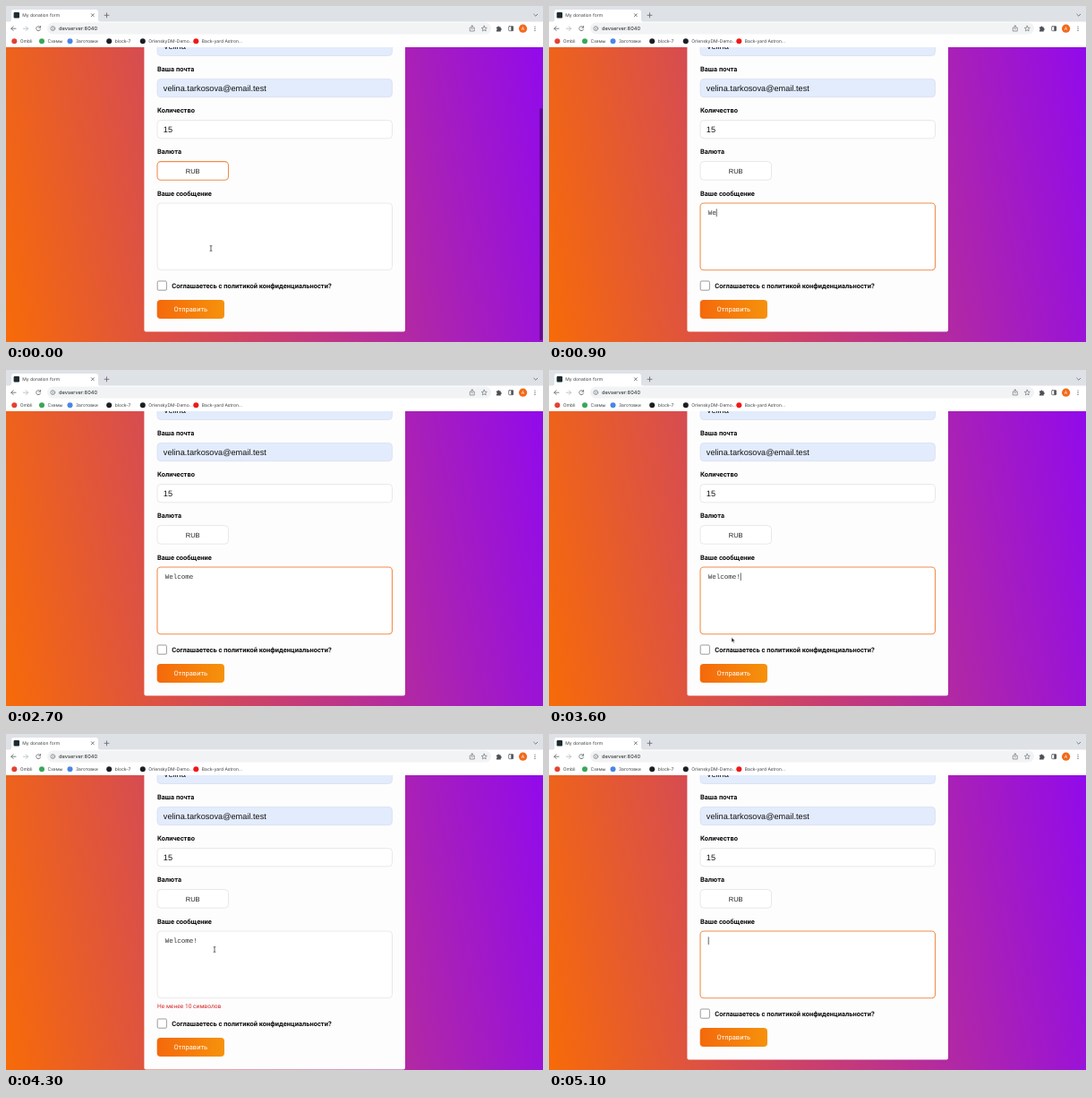
An HTML page that plays this animation: 600x375 px, repeating every 5.2 s.

```html
<!DOCTYPE html>
<html lang="ru">
<head>
<meta charset="utf-8">
<title>My donation form</title>
<style>
  html, body { margin: 0; width: 100%; height: 100%; overflow: hidden; background: #fff; }
  svg { display: block; width: 600px; height: 375px; }
  text { white-space: pre; text-rendering: geometricPrecision; }
  .ui { font: 5px Inter, "Open Sans", sans-serif; fill: #3c4043; }
  .url { font-size: 5.7px; fill: #202124; }
  .label { font: 700 7.5px Roboto, sans-serif; fill: #0c0c0c; }
  .value { font: 9.2px "Liberation Sans", Arial, sans-serif; fill: #111; }
  .choice { font: 7.5px "Liberation Sans", Arial, sans-serif; fill: #222; text-anchor: middle; }
  .send { font: 7.5px Roboto, sans-serif; fill: #fff; text-anchor: middle; }
  .error { font: 6.67px Roboto, sans-serif; fill: #d32626; }
  .mono { font: 7.5px "Liberation Mono", "Courier New", monospace; fill: #333; }
  .field { fill: #fff; stroke: #e3e3e6; stroke-width: .8; }
  .filled { fill: #e3ecfc; stroke: #d9e0ec; }
  .icon { fill: none; stroke: #5f6368; stroke-width: .8; stroke-linecap: round; stroke-linejoin: round; }
</style>
</head>
<body>
<svg viewBox="0 0 600 375">
  <defs>
    <linearGradient id="sky" gradientUnits="userSpaceOnUse" x1="-26.5" y1="225" x2="626.5" y2="110">
      <stop offset="0" stop-color="#f76b08"/>
      <stop offset="1" stop-color="#8f08f0"/>
    </linearGradient>
    <linearGradient id="warm">
      <stop offset="0" stop-color="#f4690b"/>
      <stop offset="1" stop-color="#f6920c"/>
    </linearGradient>
  </defs>

  <rect y="46" width="600" height="329" fill="url(#sky)"/>
  <rect id="thumb" x="596.3" y="114" width="3.2" height="259" rx="1.6" fill="#000" fill-opacity=".38"/>
  <rect id="card" x="154.4" y="30" width="291.6" rx="2" fill="#fefdfe"/>

  <rect class="field filled" x="169" y="35.2" width="262.5" height="20.3" rx="4"/>
  <text class="value" x="175.8" y="48.4">Velina</text>
  <text class="label" x="169" y="72.8">Ваша почта</text>
  <rect class="field filled" x="169" y="81.4" width="262.5" height="20.3" rx="4"/>
  <text class="value" x="175.8" y="94.6">velina.tarkosova@email.test</text>
  <text class="label" x="169" y="119">Количество</text>
  <rect class="field" x="169" y="127.5" width="262.5" height="20.3" rx="4"/>
  <text class="value" x="175.8" y="140.9">15</text>
  <text class="label" x="169" y="165.3">Валюта</text>
  <rect id="currency" class="field" x="169" y="173.6" width="79.5" height="20.6" rx="4"/>
  <text class="choice" x="208.7" y="186.5">RUB</text>
  <text class="label" x="169" y="211.5">Ваше сообщение</text>
  <rect id="area" class="field" x="169" y="220" width="262.5" height="74.7" rx="4"/>
  <rect id="selection" y="226.6" height="8.8" fill="#a8c9ee"/>
  <text id="message" class="mono" x="177.8" y="233"></text>
  <rect id="caret" y="226.4" width=".7" height="8.6" fill="#222"/>
  <text id="error" class="error" x="169" y="306">Не менее 10 символов</text>

  <g id="footer">
    <rect x="169.2" y="307" width="10.2" height="10.2" rx="1.2" fill="#fff" stroke="#858585" stroke-width=".8"/>
    <text class="label" x="185.3" y="314.6">Соглашаетесь с политикой конфиденциальности?</text>
    <rect x="168.7" y="328" width="75.3" height="21" rx="4" fill="url(#warm)"/>
    <text class="send" x="206.3" y="341.2">Отправить</text>
  </g>

  <!-- browser window -->
  <rect width="600" height="18" fill="#dee1e6"/>
  <path d="M3 18Q6 18 6 15V7Q6 4 9 4H100Q103 4 103 7V15Q103 18 106 18Z" fill="#fff"/>
  <rect y="17.5" width="600" height="28.5" fill="#fff"/>
  <rect x="8.6" y="7" width="6.4" height="6.4" rx="1" fill="#1d2b30"/>
  <text class="ui" x="18.2" y="12">My donation form</text>
  <rect x="46" y="18.6" width="496" height="13" rx="6.5" fill="#f1f3f4"/>
  <text class="ui url" x="59" y="27.1">devserver:8040</text>
  <g class="icon">
    <path d="M95.3 8.7l3 3m0-3l-3 3M110 10.3h5m-2.5-2.5v5M589.8 9.2l2 2 2-2"/>
    <path d="M11 25.2H5.8m2.4-2.4l-2.4 2.4 2.4 2.4"/>
    <path d="M19.4 25.2h5.2m-2.4-2.4l2.4 2.4-2.4 2.4" stroke="#b4b7bb"/>
    <path d="M38.2 23.6A2.5 2.5 0 1 0 38.6 26M38.6 22.4v1.8h-1.8"/>
    <circle cx="52.3" cy="25.1" r="2.4" stroke-width=".6"/>
    <path d="M52.3 25v1.3m0-2.5v.1" stroke-width=".6"/>
    <path d="M519.6 24.2h-1.3v3.8h5v-3.8h-1.3M520.8 26v-4.2m-1.3 1.3l1.3-1.3 1.3 1.3" stroke-width=".6"/>
    <path d="M534.3 22.2l.9 2 2.1.2-1.6 1.4.5 2.1-1.9-1.1-1.9 1.1.5-2.1-1.6-1.4 2.1-.2z" stroke-width=".6"/>
    <rect x="561.7" y="22.7" width="5" height="5" rx=".6"/>
  </g>
  <g fill="#4d5156">
    <path d="M548 23.5h1.4a1 1 0 0 1 2 0h1.4v1.5a1 1 0 0 1 0 2v1.4H548v-1.5a1 1 0 0 0 0-1.9z"/>
    <rect x="564.3" y="22.7" width="2.4" height="5"/>
    <circle cx="591" cy="23" r=".6"/><circle cx="591" cy="25.2" r=".6"/><circle cx="591" cy="27.4" r=".6"/>
  </g>
  <circle cx="577.6" cy="25.2" r="4.6" fill="#f26a1b"/>
  <text class="ui" x="577.6" y="27" text-anchor="middle" style="fill:#fff">А</text>
  <g id="bookmarks"></g>

  <g id="cursor" stroke-linejoin="round">
    <path id="arrow" d="M0 0V5.4L1.3 4.2 2.2 6.2 3.1 5.8 2.2 3.9H3.9Z" fill="#111" stroke="#fff" stroke-width=".5"/>
    <path id="beam" d="M-1.3-3Q0-3 0-2.2Q0-3 1.3-3M0-2.2V2.2M-1.3 3Q0 3 0 2.2Q0 3 1.3 3" fill="none" stroke="#222" stroke-width=".7"/>
    <path id="hand" d="M-.6 0Q0-.7.6 0V2.4L2.8 3Q3.3 3.3 3.2 4L2.7 6.6H-.7L-2.3 4.2Q-2.2 3.3-1.4 3.7L-.6 4.3Z" fill="#fff" stroke="#111" stroke-width=".6"/>
  </g>
</svg>
<script>
const LOOP = 5200, STEP = 100, FADE = 200, BLINK = 500;
const TEXT = "Welcome!", TEXT_X = 177.8, CHAR = 4.5, ERROR_SHIFT = 11;
const FOCUS = 300, SUBMIT = 3900, SELECT = 4700, CLEAR = 5100;

// [time, typed characters]
const keys = [[FOCUS, 0], [800, 1], [900, 2], [1000, 3], [1100, 5], [1200, 7], [3200, 8], [CLEAR, 0]];
// [time, x, y]
const path = [
  [0, 229, 270.5], [3400, 227, 268], [3600, 204, 298.5], [3800, 204, 338], [4100, 206, 342],
  [4300, 233, 240.5], [4500, 216, 232], [4700, 214, 231], [4900, 148.5, 233.5], [5200, 148.5, 233.5]
];
const bookmarks = [
  [9.3, "#e34133", "Ombli"], [40, "#3aa757", "Схемы"], [71.5, "#4a86e8", "Заготовки"],
  [115.2, "#1b1f23", "block-7"], [152.8, "#1b1f23", "OrlenskyDM-Demo..."], [212.3, "#f01818", "Back-yard Astron..."]
];

const $ = id => document.getElementById(id);
const clamp = v => Math.max(0, Math.min(1, v));
const show = (id, on) => $(id).setAttribute("visibility", on ? "visible" : "hidden");
const set = (id, attrs) => { for (const k in attrs) $(id).setAttribute(k, attrs[k]); };
const ramp = (t, start) => clamp((t - start) / FADE);

$("bookmarks").innerHTML = bookmarks.map(([x, color, name]) =>
  `<circle cx="${x}" cy="39.3" r="3" fill="${color}"/><text class="ui" x="${x + 6.5}" y="41.1">${name}</text>`).join("");

function pointAt(t) {
  const i = Math.max(1, path.findIndex(p => p[0] > t));
  const [a, b] = [path[i - 1], path[i]];
  const k = (t - a[0]) / (b[0] - a[0]);
  return [a[1] + (b[1] - a[1]) * k, a[2] + (b[2] - a[2]) * k];
}

function outline(id, k) {
  const mix = (a, b) => Math.round(a + (b - a) * k);
  $(id).style.stroke = `rgb(${mix(227, 240)},${mix(227, 142)},${mix(230, 76)})`;
  $(id).style.strokeWidth = .8 + .3 * k;
}

function drawCursor(t, shift) {
  const [x, y] = pointAt(t);
  const inside = (left, top, right, bottom) => x > left && x < right && y > top && y < bottom;
  const onArea = inside(169, 220, 431, 295);
  const onButton = inside(169, 328 + shift, 244, 349 + shift);
  const seen = t < 800 || (t >= 3400 && t < CLEAR);
  set("cursor", { transform: `translate(${x} ${y})` });
  show("beam", seen && onArea);
  show("hand", seen && onButton);
  show("arrow", seen && !onArea && !onButton);
}

function draw(t) {
  const [edited, count] = keys.filter(k => k[0] <= t).pop() || [0, 0];
  const failed = t >= SUBMIT && t < CLEAR;
  const shift = failed ? ERROR_SHIFT : 0;
  const typing = (t >= FOCUS && t < SUBMIT) || t >= CLEAR;
  const end = TEXT_X + count * CHAR;

  outline("currency", 1 - ramp(t, FOCUS));
  outline("area", ramp(t, FOCUS) - ramp(t, SUBMIT) + ramp(t, SELECT));
  set("thumb", { opacity: 1 - clamp((t - 100) / 500) });
  set("card", { height: 333.4 + shift });
  set("footer", { transform: `translate(0 ${shift})` });
  show("error", failed);

  $("message").textContent = TEXT.slice(0, count);
  set("caret", { x: end });
  show("caret", typing && Math.floor((t - edited) / BLINK) % 2 === 0);

  const from = Math.max(TEXT_X, TEXT_X + Math.round((pointAt(t)[0] - TEXT_X) / CHAR) * CHAR);
  const selecting = t > SELECT && t < CLEAR;
  set("selection", { x: from, width: Math.max(0, end - from) });
  show("selection", selecting);
  drawCursor(t, shift);
}

function frame() {
  draw(Math.floor(performance.now() % LOOP / STEP) * STEP);
  requestAnimationFrame(frame);
}
frame();
</script>
</body>
</html>
```
